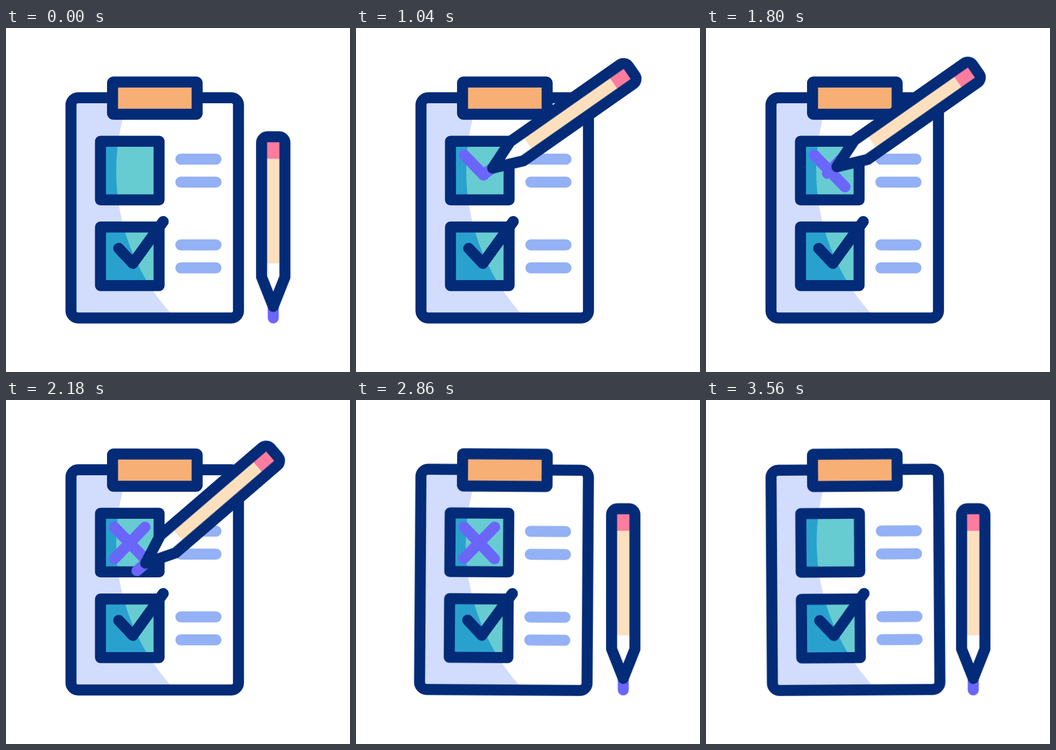
These frames come from a looping animation (640x640 px, 3.6 s). An HTML page:

```html
<!DOCTYPE html>
<html lang="en">
<head>
<meta charset="utf-8">
<title>Checklist</title>
<style>
  html, body { margin: 0; width: 100%; height: 100%; overflow: hidden; background: #fff; }
  svg { display: block; width: 100vw; height: 100vh; }

  .ink { stroke: #032b77; }
  .ink, .bar, .mark { stroke-width: 20.5; stroke-linecap: round; stroke-linejoin: round; }
  .bar { stroke: #93b1f4; }
  .mark { stroke: #6b66fa; }
  .line { fill: none; }

  #board, #pencil, #cross, .slash { animation: 3.6s infinite both; }

  #board { transform-origin: 276.6px 130.4px; animation-name: swing; }
  @keyframes swing {
    0%, 73.148% { transform: rotate(0deg); animation-timing-function: cubic-bezier(.33, .52, .64, 1); }
    76.389%, 89.352% { transform: rotate(5deg); animation-timing-function: cubic-bezier(.364, 0, .636, 1); }
    82.87% { transform: rotate(-5deg); animation-timing-function: cubic-bezier(.364, 0, .636, 1); }
    95.833% { transform: rotate(-5deg); animation-timing-function: cubic-bezier(.36, 0, .67, .48); }
    99.074%, 100% { transform: rotate(0deg); }
  }

  #pencil, .slash { animation-timing-function: cubic-bezier(.5, 0, .5, 1); }

  /* The pencil is drawn with its tip at 0,0 */
  #pencil { transform-origin: 0 0; animation-name: write; }
  @keyframes write {
    0%, 8.333% { transform: translate(497.2px, 539.3px) rotate(0deg); }
    23.148% { transform: translate(199.5px, 233.5px) rotate(55deg); }
    33.333% { transform: translate(258.7px, 296px) rotate(55deg); }
    42.593% { transform: translate(259px, 236.3px) rotate(55deg); }
    56.481% { transform: translate(201.3px, 296px) rotate(55deg); }
    69.444% { transform: translate(436px, 415px) rotate(23.5deg); }
    76.111%, 100% { transform: translate(497.2px, 539.3px) rotate(0deg); }
  }

  .slash { stroke-dasharray: 1 2; }
  #down { animation-name: down; }
  #up { animation-name: up; }
  @keyframes down {
    0%, 23.6% { opacity: 0; }
    23.61%, 100% { opacity: 1; }
    0%, 23.148% { stroke-dashoffset: 1; }
    33.333%, 100% { stroke-dashoffset: 0; }
  }
  @keyframes up {
    0%, 42.9% { opacity: 0; }
    42.91%, 100% { opacity: 1; }
    0%, 42.593% { stroke-dashoffset: 1; }
    56.481%, 100% { stroke-dashoffset: 0; }
  }

  #cross { animation-name: clear; }
  @keyframes clear {
    0%, 88% { opacity: 1; }
    98%, 100% { opacity: 0; }
  }
</style>
</head>
<body>
<svg viewBox="0 0 640 640">
  <defs>
    <clipPath id="paper"><rect x="121" y="130" width="311.5" height="409.5" rx="13.5"/></clipPath>
    <clipPath id="boxes">
      <rect x="175.8" y="210.8" width="109" height="109"/>
      <rect x="175.8" y="370.3" width="109" height="109"/>
    </clipPath>
    <g id="item">
      <rect class="ink line" x="175.8" y="210.8" width="109" height="109"/>
      <path class="bar" d="M325.3 244H390.7M325.3 286.7H390.7"/>
    </g>
  </defs>

  <g id="board">
    <g clip-path="url(#paper)">
      <rect x="110" y="120" width="333" height="430" fill="#d2dcfd"/>
      <circle cx="601" cy="266" r="396" fill="#fff"/>
    </g>
    <g clip-path="url(#boxes)">
      <rect x="170" y="200" width="120" height="290" fill="#29a1cf"/>
      <circle cx="601" cy="266" r="396" fill="#67ccd1"/>
    </g>
    <rect class="ink line" x="120.9" y="129.8" width="311.6" height="409.7" rx="13.5"/>
    <rect class="ink" x="198.2" y="100.4" width="157.4" height="60.1" rx="2" fill="#f8af76"/>
    <use href="#item"/>
    <use href="#item" y="159.5"/>
    <path class="ink line" d="M209.7 410L236 438L292.5 360"/>
    <g id="cross" class="mark line">
      <path id="down" class="slash" pathLength="1" d="M201.4 236.4L258.7 295.6"/>
      <path id="up" class="slash" pathLength="1" d="M258.7 236.4L201.4 295.6"/>
    </g>
  </g>

  <g id="pencil">
    <path class="mark" d="M0 -24V0"/>
    <path fill="#fff" d="M-21.7 -101H21.7V-76L0 -21L-21.7 -76Z"/>
    <rect x="-16" y="-296.3" width="32" height="195" fill="#fce0be"/>
    <rect x="-16" y="-332" width="32" height="36" fill="#ff7c9f"/>
    <path class="ink line" d="M-21.7 -76V-326A11 11 0 0 1 -10.7 -337H10.7A11 11 0 0 1 21.7 -326V-76L0 -21.3Z"/>
  </g>
</svg>
</body>
</html>
```
